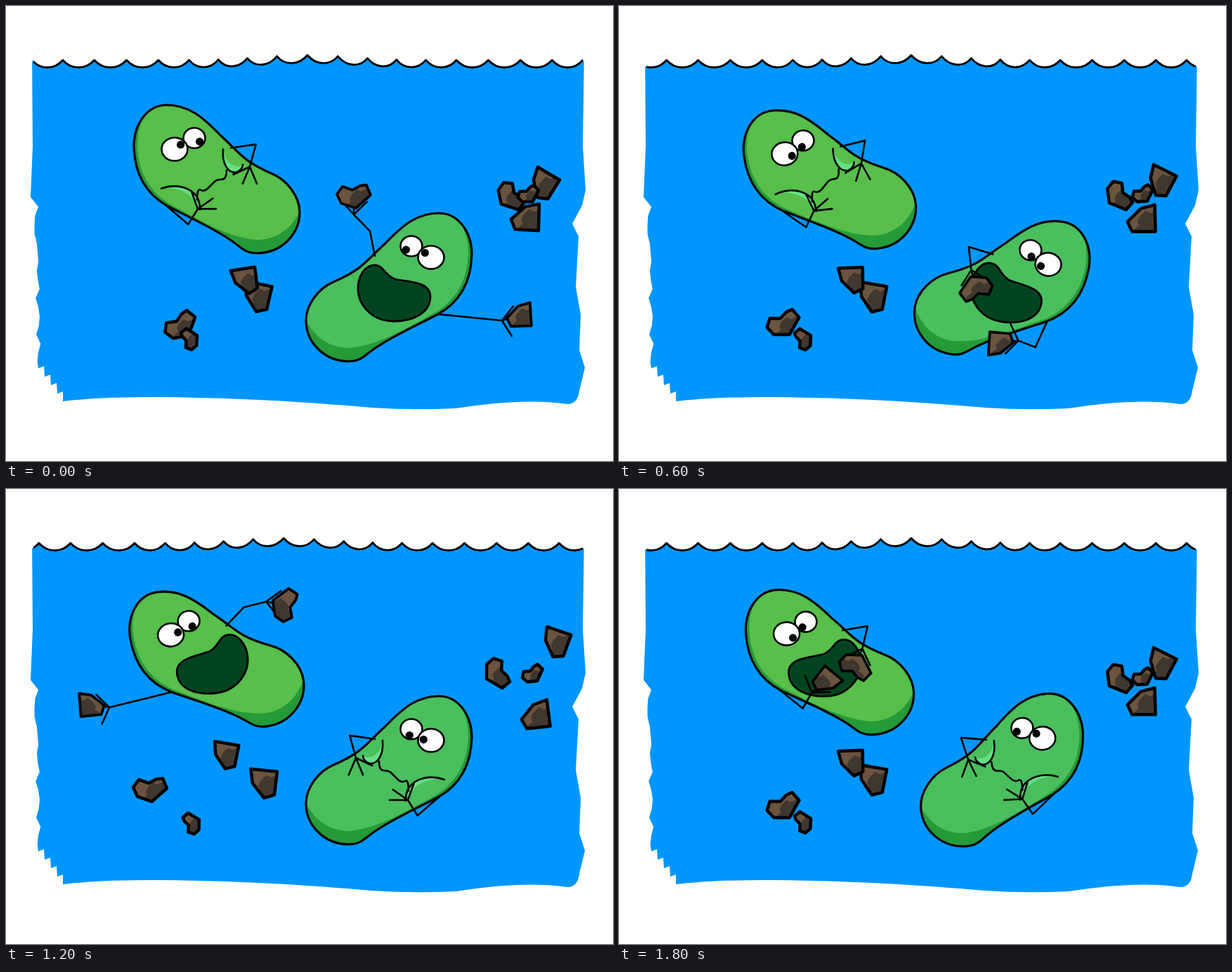
An HTML page with a canvas that plays this animation: 864 px wide and 648 px high, repeating every 2 s.

```html
<!DOCTYPE html>
<html>
<head>
<meta charset="utf-8">
<style>
  html, body { margin: 0; width: 100%; height: 100%; overflow: hidden; background: #fff; }
  canvas { display: block; }
</style>
</head>
<body>
<canvas id="stage" width="864" height="648"></canvas>
<script>
const ctx = document.getElementById('stage').getContext('2d');
const RAD = Math.PI / 180;
const clamp = (v, lo, hi) => Math.min(hi, Math.max(lo, v));
const polar = (x, y, r, deg) => [x + r * Math.cos(deg * RAD), y + r * Math.sin(deg * RAD)];

const ROCKS = {
  block: new Path2D('M-18 4L-2 -13 15 -18 17 15 -12 16Z'),
  chunk: new Path2D('M-24 -3L-16 -14 -2 -9 9 -15 18 -16 24 -2 3 17 -18 10Z')
};
const ROCK_SHADE = new Path2D('M26 -14L10 -7 4 -10 -3 -3 -6 3 -4 8 -11 14 -10 26 26 26Z');
const DEBRIS = [
  { type: 'chunk', size: .92, angle: 60, from: [717, 272], drift: [-19, -9] },
  { type: 'block', size: 1.1, angle: -56, from: [764, 254], drift: [18, -35] },
  { type: 'block', size: 1.15, angle: 5, from: [740, 301], drift: [14, 21] },
  { type: 'chunk', size: .65, angle: -20, from: [744, 269], drift: [6, -5] },
  { type: 'block', size: 1.15, angle: -75, from: [357, 414], drift: [9, 5] },
  { type: 'block', size: 1.05, angle: -95, from: [340, 391], drift: [-28, -12] },
  { type: 'chunk', size: 1, angle: -28, from: [249, 456], drift: [-44, -28] },
  { type: 'chunk', size: .65, angle: -105, from: [262, 474], drift: [3, 2] }
];

const BODY = new Path2D(`M616 295C644 295 663 322 663 354C662 395 645 422 615 439
  C590 452 548 471 523 489C510 498 505 506 488 506C452 506 427 478 427 448
  C427 425 445 402 466 393C510 374 513 362 540 338C565 312 585 295 616 295Z`);
const BODY_LIGHT = new Path2D(`M424 441C440 478 468 488 490 487C530 483 570 459 612 436
  C640 418 657 392 658 352C658 328 650 308 636 296L400 290 400 441Z`);
const MOUTH = new Path2D(`M525 369C537 369 540 385 554 389C572 393 604 392 604 414
  C604 438 578 449 552 449C520 449 501 425 501 402C501 386 510 369 525 369Z`);
const CHEEK_SHINE = new Path2D(`M535 364C536 380 526 391 518 390C513 389 510 384 509 381
  C518 385 530 380 535 364ZM622 413C600 405 572 414 572 440C580 421 598 412 622 413Z`);
const CHEWING = new Path2D(`M536 358C538 380 528 392 518 391C512 390 508 384 508 380
  M624 414C600 405 568 414 569 444M531 388q0 13 7 13t10 3t9 9t11 3t5 14`);

// Each hand pose is wrist x, wrist y and the direction the hand points
const ARMS = [
  { shoulder: [525, 356], bones: [36, 33], bend: 1, rock: 'chunk', grip: 90, fingers: [-42, 0, 46],
    poses: [[495, 297, -90], [464, 330, 162], [498, 383, 67]] },
  { shoulder: [616, 439], bones: [40, 26], bend: -1, rock: 'block', grip: 17, fingers: [-35, 0, 75],
    poses: [[706, 448, -17], [706, 448, -17], [653, 490, 73], [580, 472, 161], [572, 443, 215]] }
];

const WATER = (() => {
  let d = 'M37 60L38 200 35 272';
  for (let y = 286; y < 510; y += 13) d += `L${43 + (y - 286) / 60 + 3 * Math.sin(y * y)} ${y}`;
  for (let i = 0; i < 4; i++) d += `L${46 + 9 * i} ${516 + 12 * i}l8 -3`;
  return new Path2D(d + `L81 563Q130 557 200 557C320 557 430 564 520 572Q580 576 640 573
    C700 564 750 560 800 567Q814 566 816 548L824 515 816 490 818 440 811 400 815 328
    806 310 820 284 825 262 821 200 823 60Z`);
})();

// Scallop tips: nearly even spacing, highest in the middle
const waveTip = i => [
  37 + 43.56 * i + 6 * Math.sin(i * 20 * RAD) ** 3,
  77 - 7 * Math.exp(-(((i - 9) / 2) ** 2))
];
const WAVE = new Path2D();
WAVE.moveTo(...waveTip(-1));
for (let i = 0; i <= 20; i++) {
  const [x0, y0] = waveTip(i - 1), [x, y] = waveTip(i), w = (x - x0) * .27;
  WAVE.bezierCurveTo(x0 + w, y0 + 14, x - w, y + 14, x, y);
}
const SEA = new Path2D(WAVE);
SEA.lineTo(910, 648);
SEA.lineTo(-10, 648);

function isolated(draw) {
  ctx.save();
  draw();
  ctx.restore();
}

function fill(shape, color) {
  ctx.fillStyle = color;
  ctx.fill(shape);
}

function stroke(shape, width) {
  ctx.lineWidth = width;
  ctx.strokeStyle = '#000';
  ctx.stroke(shape);
}

function rock(type, x, y, angle, size = 1, line = 4.5) {
  isolated(() => {
    ctx.translate(x, y);
    ctx.rotate(angle * RAD);
    ctx.scale(size, size);
    fill(ROCKS[type], '#6b543e');
    isolated(() => {
      ctx.clip(ROCKS[type]);
      ctx.rotate(-angle * RAD);
      fill(ROCK_SHADE, '#40372f');
    });
    stroke(ROCKS[type], line / size);
  });
}

function eye(x, y, rx, ry, reach, angle) {
  const ball = new Path2D(), pupil = new Path2D();
  ball.ellipse(x, y, rx, ry, 0, 0, 7);
  pupil.arc(...polar(x, y, reach, angle), 5.6, 0, 7);
  fill(ball, '#fff');
  stroke(ball, 2.6);
  fill(pupil, '#000');
}

// Two-bone limb: the elbow follows from shoulder and wrist
function arm({ shoulder, bones: [a, b], bend, rock: type, grip, fingers, poses }, beat) {
  const [x, y, aim] = poses[Math.min(beat, poses.length - 1)];
  const dx = x - shoulder[0], dy = y - shoulder[1], reach = Math.hypot(dx, dy);
  const fold = Math.acos(clamp((a * a + reach * reach - b * b) / (2 * a * reach), -1, 1));
  const limb = new Path2D();
  limb.moveTo(...shoulder);
  limb.lineTo(...polar(...shoulder, a, (Math.atan2(dy, dx) + bend * fold) / RAD));
  limb.lineTo(x, y);
  for (const spread of fingers) {
    limb.moveTo(x, y);
    limb.lineTo(...polar(x, y, 26, aim + spread));
  }
  stroke(limb, 2.6);
  if (beat < 5) rock(type, ...polar(x, y, 26, aim), aim + grip, 1, 3.8);
}

// Beats 0-4 eat, beats 5-9 chew
function creature(beat, tilt, look, color) {
  ctx.translate(545, 401);
  ctx.rotate(tilt * RAD);
  ctx.translate(-545, -401);
  fill(BODY, '#259a39');
  isolated(() => {
    ctx.clip(BODY);
    fill(BODY_LIGHT, color);
  });
  stroke(BODY, 3.2);
  eye(577, 342, 15.5, 14.5, 9.2, 146 - 88 * look - tilt);
  eye(605, 358, 18.5, 16.5, 10.8, 217 - 70 * look - tilt);
  if (beat < 5) {
    fill(MOUTH, '#00441f');
    stroke(MOUTH, 2.8);
  } else {
    fill(CHEEK_SHINE, '#66e083');
    stroke(CHEWING, 2.6);
  }
  for (const a of ARMS) arm(a, beat);
}

function water(step) {
  const shift = step * (14 - .9 * step);
  isolated(() => {
    ctx.clip(WATER);
    ctx.translate(-shift, 0);
    fill(SEA, '#0096ff');
    ctx.beginPath();
    ctx.rect(39 + shift, 0, 782, 200);
    ctx.clip();
    stroke(WAVE, 2.8);
  });
}

// Pieces drift evenly sideways, speed up vertically and roll as they go
function debris(step) {
  const p = step / 3;
  for (const { type, size, angle, from: [x, y], drift: [dx, dy] } of DEBRIS)
    rock(type, x + dx * p, y + dy * p * p, angle - .65 * dx * p, size);
}

function draw(now) {
  const t = now % 2000;
  const beat = Math.floor(t / 200);
  const drift = Math.floor(t * .003);
  const step = Math.min(drift, 6 - drift);

  ctx.lineJoin = ctx.lineCap = 'round';
  ctx.fillStyle = '#fff';
  ctx.fillRect(0, 0, 864, 648);
  water(step);
  debris(step);
  isolated(() => {
    const hop = 5 * Math.max(0, 1 - Math.abs(beat - 6) * .8);
    ctx.translate(845, -154 - hop);
    ctx.scale(-1, 1);
    creature((beat + 5) % 10, 10 - 2 * Math.abs(beat - 5), beat % 5 / 4, '#57bf4a');
  });
  isolated(() => {
    const swing = Math.abs((beat + 2) % 10 - 5);
    creature(beat, 9 - 3 * swing, Math.max(0, 1 - .28 * Math.abs(beat - 4)), '#4abf5e');
  });
  requestAnimationFrame(draw);
}
requestAnimationFrame(draw);
</script>
</body>
</html>
```
